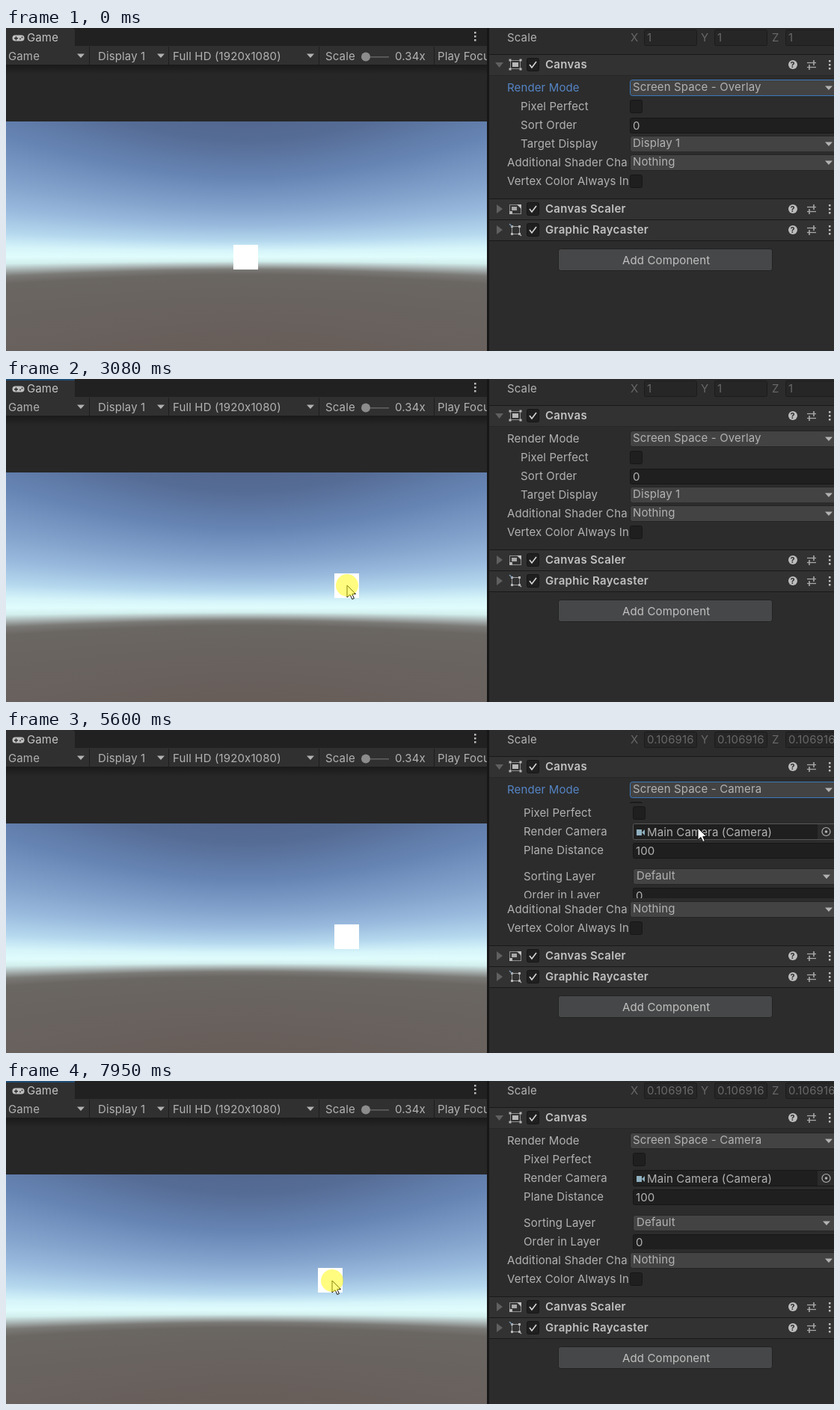
Recreate the animation shown at these times as an HTML page with a canvas. Size 1107 px wide and 432 px high, loop 8000 ms.

```html
<!DOCTYPE html>
<html>
<head>
<meta charset="utf-8">
<style>
html, body { margin: 0; width: 100%; height: 100%; overflow: hidden; background: #2c2c2c; }
canvas { display: block; }
</style>
</head>
<body>
<canvas id="stage" width="1107" height="432"></canvas>
<script>
const LOOP = 8000, W = 1107;
const c = document.getElementById('stage').getContext('2d');
const UI = '15px Inter, sans-serif', BOLD = '600 15px Inter, sans-serif';
const MENU = '15.7px "Noto Sans", sans-serif';
const SPACING = { [UI]: '.13px', [BOLD]: '.3px' };
const TEXT = '#b2b2b2', DARK = '#1f1f1f', EDGE = '#161616', BLUE = '#3b79bd';

// Paths as [time, x, y]
const pointerPath = [
  [190, 642, 392], [540, 260, 332], [740, 323, 303], [1210, 323, 303], [1410, 345, 299],
  [1900, 445, 265], [2040, 437, 266], [2400, 356, 281], [2870, 436, 279], [3080, 456, 276],
  [3490, 456, 276], [4250, 934, 84], [4520, 934, 84], [4900, 925, 131], [5850, 925, 131],
  [6430, 466, 272], [6580, 458, 273], [6840, 458, 273], [7420, 309, 274], [7670, 335, 273],
  [7950, 436, 267]
];
const squarePath = [
  [1210, 304, 290], [1410, 326, 283], [1900, 426, 249], [2040, 419, 250], [2400, 338, 265],
  [2870, 418, 263], [3080, 439, 260], [6840, 439, 260], [7420, 291, 256], [7670, 316, 256],
  [7950, 417, 250]
];

function along(path, t) {
  const i = path.findIndex(k => k[0] > t);
  if (i === 0) return path[0].slice(1);
  if (i < 0) return path[path.length - 1].slice(1);
  const a = path[i - 1], b = path[i];
  const u = (t - a[0]) / (b[0] - a[0]), e = u * u * (3 - 2 * u);
  return [a[1] + (b[1] - a[1]) * e, a[2] + (b[2] - a[2]) * e];
}

const between = (t, a, b) => t >= a && t < b;
const over = (mouse, x, y) => mouse && mouse[0] >= x && Math.abs(mouse[1] - y) < 11;

function rect(x, y, w, h, color) {
  c.fillStyle = color;
  c.fillRect(x, y, w, h);
}

function box(x, y, w, h, r, fill, stroke) {
  c.beginPath();
  c.roundRect(x + .5, y + .5, w - 1, h - 1, r);
  c.fillStyle = fill;
  c.fill();
  if (stroke) { c.strokeStyle = stroke; c.lineWidth = 1; c.stroke(); }
}

function line(points, color, width = 1, close) {
  c.beginPath();
  points.forEach(p => c.lineTo(...p));
  if (close) c.closePath();
  c.strokeStyle = color;
  c.lineWidth = width;
  c.stroke();
}

function poly(points, color) {
  c.beginPath();
  points.forEach(p => c.lineTo(...p));
  c.closePath();
  c.fillStyle = color;
  c.fill();
}

function disc(x, y, r, color) {
  c.beginPath();
  c.arc(x, y, r, 0, 7);
  c.fillStyle = color;
  c.fill();
}

function clip(x, y, w, h, draw) {
  c.save();
  c.beginPath();
  c.rect(x, y, w, h);
  c.clip();
  draw();
  c.restore();
}

// y is the middle of the line
function text(s, x, y, color = TEXT, font = UI) {
  c.font = font;
  c.letterSpacing = SPACING[font] || '0px';
  c.fillStyle = color;
  c.fillText(s, x, y + 5);
}

const arrow = (x, y) => poly([[x - 5, y - 2.5], [x + 5, y - 2.5], [x, y + 3]], TEXT);
const kebab = (x, y) => [-5, 0, 5].forEach(d => rect(x - 1, y + d - 1, 2.5, 2.5, '#bdbdbd'));

function check(x, y, on) {
  box(x, y - 9, 17, 18, 2, DARK, EDGE);
  if (on) line([[x + 4, y], [x + 7, y + 4], [x + 13, y - 4]], '#d8d8d8', 1.6);
}

function field(s, x, y) {
  box(x, y - 10, 290, 21, 2, DARK, EDGE);
  text(s, x + 4, y + 1);
}

function dropdown(s, x, y, focused, mouse) {
  const fill = over(mouse, x, y) ? '#4a4a4a' : '#434343';
  box(x, y - 10, focused ? W - x + 4 : 290, 22, 3, fill, focused ? BLUE : '#242424');
  text(s, x + 4 + (x > 836), y);
  arrow(x > 836 ? 1097 : 1100, y + 1);
}

function header(s, y, open, icon) {
  rect(646, y - 13, W, 28, '#323232');
  rect(646, y - 14, W, 1, '#191919');
  const grey = '#606060';
  if (open) poly([[654, y - 3], [665, y - 3], [659.5, y + 4]], grey);
  else poly([[656, y - 6], [664, y], [656, y + 6]], grey);
  icon(681, y);
  check(696, y, true);
  text(s, 721, y, '#c2c2c2', BOLD);
  disc(1052, y, 6, '#bdbdbd');
  text('?', 1048.5, y - 1, '#323232', '700 11px Inter, sans-serif');
  [[-3, 3], [3, -3]].forEach(([dy, dx]) => {
    line([[1071, y + dy + .5], [1083, y + dy + .5]], '#a8a8a8', 1.3);
    line([[1077 + dx, y + dy - 3], [1077 + dx, y + dy + 4]], '#a8a8a8', 1.6);
  });
  kebab(1101, y);
}

function corners(x, y, w, h, size) {
  [-w, w].forEach(dx => [-h, h].forEach(dy =>
    rect(x + dx - size / 2, y + dy - size / 2, size, size, '#b8b8b8')));
}

function canvasIcon(x, y) {
  c.strokeStyle = '#8d8d8d';
  c.lineWidth = 1;
  c.strokeRect(x - 6.5, y - 5.5, 13, 11);
  rect(x - 4, y - 3, 8, 6, '#b8b8b8');
  corners(x, y, 7, 6, 3);
}

function scalerIcon(x, y) {
  c.strokeStyle = '#8d8d8d';
  c.lineWidth = 1;
  c.strokeRect(x - 7.5, y - 5.5, 15, 12);
  rect(x - 5, y - 3, 7, 5, '#a8a8a8');
  rect(x - 8, y + 3, 4, 4, '#b8b8b8');
  poly([[x + 2, y - 6], [x + 8, y - 6], [x + 8, y]], '#c4c4c4');
}

function rayIcon(x, y) {
  c.strokeStyle = '#999';
  c.lineWidth = 1;
  c.strokeRect(x - 4.5, y - 4.5, 10, 10);
  corners(x + .5, y + .5, 5, 5, 3);
  line([[x - 8, y - 8], [x - 4, y - 4]], '#7f9cb8', 1.3);
  line([[x + 6, y + 6], [x + 8, y + 8]], '#b8b8b8', 1.3);
}

// Sky lines of equal elevation bow away from the horizon towards the sides
const horizon = 306;
const sky = c.createLinearGradient(0, -181, 0, 126);
[[-181, '#536890'], [-156, '#556c95'], [-106, '#6684b3'], [-66, '#82a1cb'], [-41, '#99badd'],
 [-21, '#b5d8ee'], [-8, '#d6f5fa'], [0, '#e0fcfc'], [6, '#d2efee'], [11, '#adb9b8'],
 [17, '#7b7a77'], [24, '#6a6662'], [126, '#675d59']]
  .forEach(([y, color]) => sky.addColorStop((y + 181) / 307, color));

function drawSky() {
  c.save();
  c.fillStyle = sky;
  for (let x = 0; x < 643; x++) {
    const s = Math.hypot(1, 1.15 * (x - 321.5) / 321.5);
    c.setTransform(1, 0, 0, s, x, horizon);
    c.fillRect(0, -181 / s, 1, 307 / s);
  }
  c.restore();
}

function gamepad(x, y) {
  box(x - 8, y - 4, 17, 9, 4, '#c0c0c0');
  rect(x - 5, y, 5, 1.5, '#303030');
  rect(x - 3.3, y - 1.7, 1.5, 5, '#303030');
  disc(x + 3, y + 1.5, 1, '#303030');
  disc(x + 5.5, y - .5, 1, '#303030');
}

function drawGame() {
  rect(0, 0, 643, 24, '#212121');
  c.beginPath();
  c.roundRect(-4, 0, 96, 30, 4);
  c.fillStyle = '#303030';
  c.fill();
  gamepad(16, 13);
  text('Game', 28, 13, '#c4c4c4');
  kebab(627, 11);

  rect(0, 24, 643, 26, '#303030');
  [111, 217, 418, 572].forEach(x => rect(x, 25, 1, 24, '#1d1d1d'));
  text('Game', 3, 38);
  text('Display 1', 123, 38);
  text('Full HD (1920x1080)', 223, 38);
  text('Scale', 427, 38);
  text('0.34x', 520, 38);
  clip(573, 24, 70, 26, () => text('Play Focused', 577, 38));
  [100, 207, 407].forEach(x => arrow(x, 37));
  rect(481, 38, 31, 1.5, '#636363');
  disc(481, 38.5, 6, '#8c8c8c');

  rect(0, 49, 643, 76, '#272727');
  const shade = c.createLinearGradient(0, 49, 0, 62);
  shade.addColorStop(0, '#1a1a1a');
  shade.addColorStop(1, '#272727');
  rect(0, 49, 643, 13, shade);
  drawSky();
}

const backdrop = document.createElement('canvas');
function bakeGame() {
  backdrop.width = 643;
  backdrop.height = 432;
  drawGame();
  backdrop.getContext('2d').drawImage(c.canvas, 0, 0);
}

function overlayRows(mouse) {
  text('Pixel Perfect', 688, 105);
  check(834, 105);
  text('Sort Order', 688, 130);
  field('0', 834, 130);
  text('Target Display', 688, 155);
  dropdown('Display 1', 834, 154, false, mouse);
}

function cameraRows(mouse) {
  ['Pixel Perfect', 'Render Camera', 'Plane Distance', 'Sorting Layer', 'Order in Layer']
    .forEach((s, i) => text(s, 692, 105 + 25 * i + (i > 2 ? 10 : 0)));
  check(838, 105);
  box(838, 119, 290, 22, 2, DARK, over(mouse, 838, 130) ? '#585858' : EDGE);
  rect(1085, 120, 30, 20, '#2b2b2b');
  rect(843, 127, 7, 8, '#8fb0bf');
  poly([[850, 131], [854, 127], [854, 135]], '#8fb0bf');
  text('Main Camera (Camera)', 857, 131);
  c.beginPath();
  c.arc(1096.5, 130, 5.5, 0, 7);
  c.strokeStyle = TEXT;
  c.lineWidth = 1.2;
  c.stroke();
  disc(1096.5, 130, 1.8, TEXT);
  field('100', 838, 155);
  dropdown('Default', 838, 189, false, mouse);
  field('0', 838, 215);
}

function drawInspector(t, mouse) {
  const camera = t >= 5330;
  const focused = t < 1140 || between(t, 5330, 6640);
  const u = Math.min(1, Math.max(0, (t - 5365) / 500));
  const open = 1 - (1 - u) ** 4;
  const shift = Math.round(60 * Math.min(1, open * 1.08));
  const split = 92 + Math.round(75 * (1 - open));
  const end = 165 + shift;
  const raised = dy => mouse && [mouse[0], mouse[1] - dy];

  rect(643, 0, 3, 432, '#171717');
  rect(646, 0, W, 432, '#2c2c2c');
  text('Scale', 670, 13);
  ['X', 'Y', 'Z'].forEach((axis, i) => {
    const x = 853 + i * 94.7 | 0;
    text(axis, x - 18, 13, '#686868');
    box(x, 2, 71, 22, 2, '#262626', '#1c1c1c');
    clip(x, 0, 68, 26, () => text(camera ? '0.106916' : '1', x + 4, 13, '#686868'));
  });

  header('Canvas', 49, true, canvasIcon);
  rect(646, 63, W, 1, '#272727');
  text('Render Mode', 670, 80, focused ? '#5585c5' : TEXT);
  dropdown('Screen Space - ' + (camera ? 'Camera' : 'Overlay'), 834, 79, focused, mouse);
  clip(646, 92, W, Math.min(split, end) - 92, () => overlayRows(mouse));
  if (camera) clip(646, split, W, Math.max(0, end - split), () => {
    c.translate(0, split - 92);
    cameraRows(raised(split - 92));
  });

  c.save();
  c.translate(0, shift);
  clip(646, 160, 186, 60, () => {
    text('Additional Shader Channels', 670, 180);
    text('Vertex Color Always In Gamma', 670, 205);
  });
  dropdown('Nothing', 834, 179, false, raised(shift));
  check(834, 205);
  header('Canvas Scaler', 242, false, scalerIcon);
  header('Graphic Raycaster', 270, false, rayIcon);
  rect(646, 284, W, 1, '#191919');
  box(738, 295, 287, 30, 3, '#464748', '#222');
  text('Add Component', 824, 311, '#c0c0c0');
  c.restore();
}

function drawMenu(mouse) {
  c.save();
  c.shadowColor = 'rgba(0,0,0,.45)';
  c.shadowBlur = 12;
  c.shadowOffsetY = 4;
  box(834, 91, 300, 84, 7, '#fafafa');
  c.restore();
  const row = Math.floor((mouse[1] - 94) / 26);
  if (row >= 0) box(841, 94 + row * 26, 290, 26, 4, '#efefef');
  ['Screen Space - Overlay', 'Screen Space - Camera', 'World Space']
    .forEach((s, i) => text(s, 879, 108 + i * 26, '#111', MENU));
  line([[849, 107], [852, 110.5], [859, 103.5]], '#222', 1.1);
}

function drawPointer([x, y], pressed) {
  c.save();
  c.translate(x, y);
  const shape = [[0, 0], [0, 16], [4, 12.5], [6.8, 18.5], [9.4, 17.4], [6.8, 11.6], [11.5, 11.5]];
  poly(shape, '#fff');
  line(shape, '#111', 1, true);
  if (pressed) disc(0, 0, 15, 'rgba(255,250,0,.5)');
  c.restore();
}

function render(t) {
  const mouse = t >= 190 ? along(pointerPath, t) : null;
  const pressed = between(t, 1140, 3490) || between(t, 4380, 4500) ||
    between(t, 5260, 5330) || t >= 6640;
  const menu = between(t, 4520, 5330);

  c.drawImage(backdrop, 0, 0);
  if (between(t, 1140, 5260) || t >= 6640) rect(0, 0, 92, 2, '#204d75');
  const [x, y] = along(squarePath, t);
  rect(Math.round(x), Math.round(y), 33, 33, '#fff');
  drawInspector(t, menu ? null : mouse);
  if (menu) drawMenu(mouse);
  if (mouse) drawPointer(mouse, pressed);
}

bakeGame();
const start = performance.now();
function tick() {
  render((performance.now() - start) % LOOP);
  requestAnimationFrame(tick);
}
tick();
</script>
</body>
</html>
```
